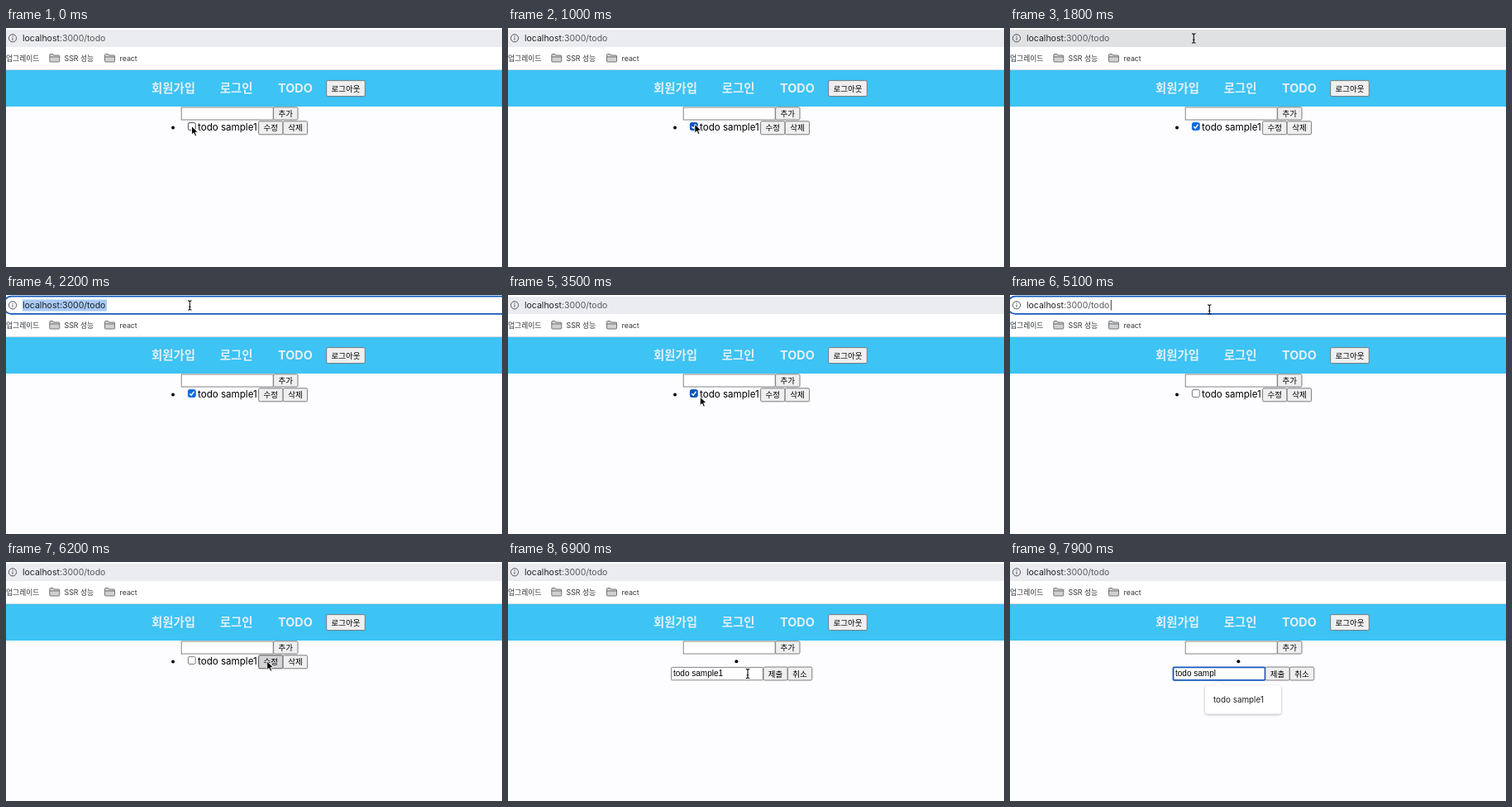
Recreate the animation shown at these times as an HTML page. Size 600 by 289 pixels, loop 8 s.

```html
<!DOCTYPE html>
<html lang="ko">
<head>
<meta charset="utf-8">
<title>Todo</title>
<style>
  html, body { margin: 0; height: 100%; overflow: hidden; background: #fdfcfe; }
  svg { display: block; width: 100vw; height: 100vh; font-family: Inter, "Noto Sans CJK KR", "Noto Sans CJK", sans-serif; }
  text { white-space: pre; }
  .bookmark { font-size: 8.8px; fill: #333539; }
  .nav { font-size: 14.4px; font-weight: 700; fill: #e6f0f5; }
  .button rect { fill: #efeff0; stroke: #6f7073; stroke-width: .9; }
  .button.hover rect { fill: #d3d3d5; stroke: #444; }
  .button text { font-size: 9.5px; text-anchor: middle; }
  .field { fill: #fff; stroke: #77787b; stroke-width: .9; }
  .input { font: 10px "Liberation Sans", sans-serif; }
  .focus { stroke: #1558bd; stroke-width: 1.8; }
  .folder { fill: #cfd0d2; stroke: #67696d; stroke-width: .9; stroke-linejoin: round; }
</style>
</head>
<body>
<svg viewBox="0 0 600 289" preserveAspectRatio="none">
  <defs>
    <filter id="shadow" x="-20%" y="-20%" width="140%" height="150%">
      <feDropShadow dx="0" dy="1" stdDeviation="1.4" flood-opacity=".32"/>
    </filter>
    <path id="folder" d="M.5 9V1.5q0-1 1-1h3l1.3 1.5h5.7q1 0 1 1V9q0 1-1 1H1.5q-1 0-1-1zM.5 4h12"/>
  </defs>

  <!-- browser chrome -->
  <rect width="600" height="51" fill="#fff"/>
  <rect id="bar" y="2" width="600" height="21" fill="#ebecf0"/>
  <rect id="ring" class="focus" x="-2.5" y="1.7" width="640" height="21.2" rx="9" fill="#fff"/>
  <rect id="selection" x="20" y="5.5" width="102" height="14" fill="#a8cbf6"/>
  <g fill="none" stroke="#55585d">
    <circle cx="8" cy="12.3" r="4.6"/>
    <path d="M8 11.6v3.2M8 9.5v1.2"/>
  </g>
  <text x="20" y="16" font-size="10.5" fill="#1f2023">localhost<tspan id="path">:3000/todo</tspan></text>
  <path id="urlCaret" d="M122.3 6v12.5" stroke="#222" stroke-width=".9"/>
  <text class="bookmark" x="0" y="39.5" font-size="8.6">업그레이드</text>
  <use href="#folder" class="folder" x="52.3" y="31"/>
  <text class="bookmark" x="70.5" y="39.5">SSR 성능</text>
  <use href="#folder" class="folder" x="119" y="31"/>
  <text class="bookmark" x="137.5" y="39.5">react</text>
  <rect y="50" width="600" height="1" fill="#d3d9de"/>

  <!-- page -->
  <rect y="51" width="600" height="44" fill="#3dc3f4"/>
  <text class="nav" x="176" y="77.7">회원가입</text>
  <text class="nav" x="258.7" y="77.7">로그인</text>
  <text class="nav" x="329" y="77.7">TODO</text>
  <g id="top"></g>
  <rect class="field" x="212.2" y="96" width="111" height="15"/>

  <g id="item">
    <circle cx="202" cy="120.5" r="2"/>
    <rect id="box" x="220.4" y="114.6" width="8.8" height="8.8" rx="1.6"/>
    <path id="tick" d="M222.3 119.2l1.9 1.9 3.3-4.3" fill="none" stroke="#fff" stroke-width="1.4"/>
    <text x="232" y="124" font-size="11.6">todo sample1</text>
  </g>

  <g id="editor">
    <circle cx="276.3" cy="120.3" r="2"/>
    <rect id="editField" class="field" x="197.5" y="127.4" width="111" height="15.4" rx="1"/>
    <text id="editText" class="input" x="200" y="138.4"></text>
    <path id="editCaret" d="M260.8 129v11.5" stroke="#000" stroke-width=".9"/>
  </g>

  <g id="popup">
    <path filter="url(#shadow)" fill="#fff" d="M239 149.5h8l6-5.5 6 5.5h66q3 0 3 3v28q0 3-3 3h-86q-3 0-3-3v-28q0-3 3-3z"/>
    <text x="246" y="170.3" font-size="9.85" fill="#202124">todo sample1</text>
  </g>

  <path id="arrow" d="M0 0v10.6l2.5-2.3 1.7 3.9 1.9-.8-1.7-3.8h3.4z" stroke="#fff" stroke-width=".9"/>
  <path id="beam" d="M-2.2-5.6q2.2 0 2.2 1.4V4.2q0 1.4 2.2 1.4M2.2-5.6q-2.2 0-2.2 1.4M0 4.2q0 1.4-2.2 1.4M-1.3 1.8h2.6" fill="none" stroke="#111" stroke-width="1.1"/>
</svg>
<script>
const LOOP = 8000, STEP = 100;
const $ = id => document.getElementById(id);
const show = (id, on) => $(id).style.display = on ? '' : 'none';

function addButton(parent, label, x, y, w, h) {
  $(parent).insertAdjacentHTML('beforeend',
    `<g class="button"><rect x="${x}" y="${y}" width="${w}" height="${h}" rx="1.6"/>
     <text x="${x + w / 2}" y="${y + h / 2 + 3.5}">${label}</text></g>`);
  return $(parent).lastElementChild;
}
addButton('top', '로그아웃', 387.7, 63.6, 46.6, 19);
addButton('top', '추가', 323.6, 95.8, 29.4, 15.2);
const editButton = addButton('item', '수정', 305.6, 112.8, 29.4, 16);
addButton('item', '삭제', 335.2, 112.8, 29.4, 16);
addButton('editor', '제출', 309, 127, 29.2, 16);
addButton('editor', '취소', 338.4, 127, 29.4, 16);

// pointer path: time, x, y
const pointer = [
  [0, 224.5, 118.5], [700, 226, 120], [900, 226, 120], [1800, 222.3, 12.5],
  [2900, 222.3, 12.5], [3500, 232.3, 123], [3800, 231, 120.5], [4600, 238, 31],
  [4800, 238, 31], [5000, 241.3, 17.5], [5200, 241.3, 17.5], [5700, 300, 116],
  [6200, 315.7, 120], [6400, 315.7, 120], [6900, 290, 135], [LOOP, 290, 135]
];

function pointerAt(t) {
  const i = pointer.findIndex(p => p[0] > t);
  const [t0, x0, y0] = pointer[i - 1], [t1, x1, y1] = pointer[i];
  const u = (t - t0) / (t1 - t0), k = u * u * (3 - 2 * u);
  return [x0 + (x1 - x0) * k, y0 + (y1 - y0) * k];
}

function render(t) {
  const within = (a, b) => t >= a && t < b;
  const [x, y] = pointerAt(t);
  const editing = t >= 6400, typing = t >= 7700;

  // address bar
  const selected = within(1900, 2600) || within(5000, 5100);
  const urlFocus = within(1900, 2600) || within(5000, 5300);
  $('bar').setAttribute('fill', y < 24 ? '#e0e1e3' : '#ebecf0');
  show('ring', urlFocus);
  show('selection', selected);
  show('urlCaret', urlFocus && !selected);
  $('path').setAttribute('fill', selected ? '#1f2023' : '#55585d');

  // list item
  const checked = within(300, 3700);
  const hover = x > 218 && x < 234 && y > 112 && y < 126;
  const boxColor = checked ? (hover ? '#0a55bd' : '#0b6be0') : (hover ? '#4c4c50' : '#77787b');
  $('box').setAttribute('stroke', boxColor);
  $('box').setAttribute('fill', checked ? boxColor : '#fff');
  show('tick', checked);
  editButton.classList.toggle('hover', x > 306 && x < 335 && y > 113);
  show('item', !editing);

  // edit form
  show('editor', editing);
  $('editField').classList.toggle('focus', t >= 7000);
  $('editText').textContent = 'todo sample1'.slice(0, t >= 7900 ? 10 : typing ? 11 : 12);
  show('editCaret', within(7000, 7500));
  show('popup', t >= 7800);

  // pointer
  const overText = y < 24 || (editing && x < 308 && y > 127);
  show('arrow', !typing && !overText);
  show('beam', !typing && overText);
  for (const id of ['arrow', 'beam']) $(id).setAttribute('transform', `translate(${x} ${y})`);
}

function frame() {
  const t = performance.now() % LOOP;
  render(Math.floor(t / STEP) * STEP);
  requestAnimationFrame(frame);
}
frame();
</script>
</body>
</html>
```
